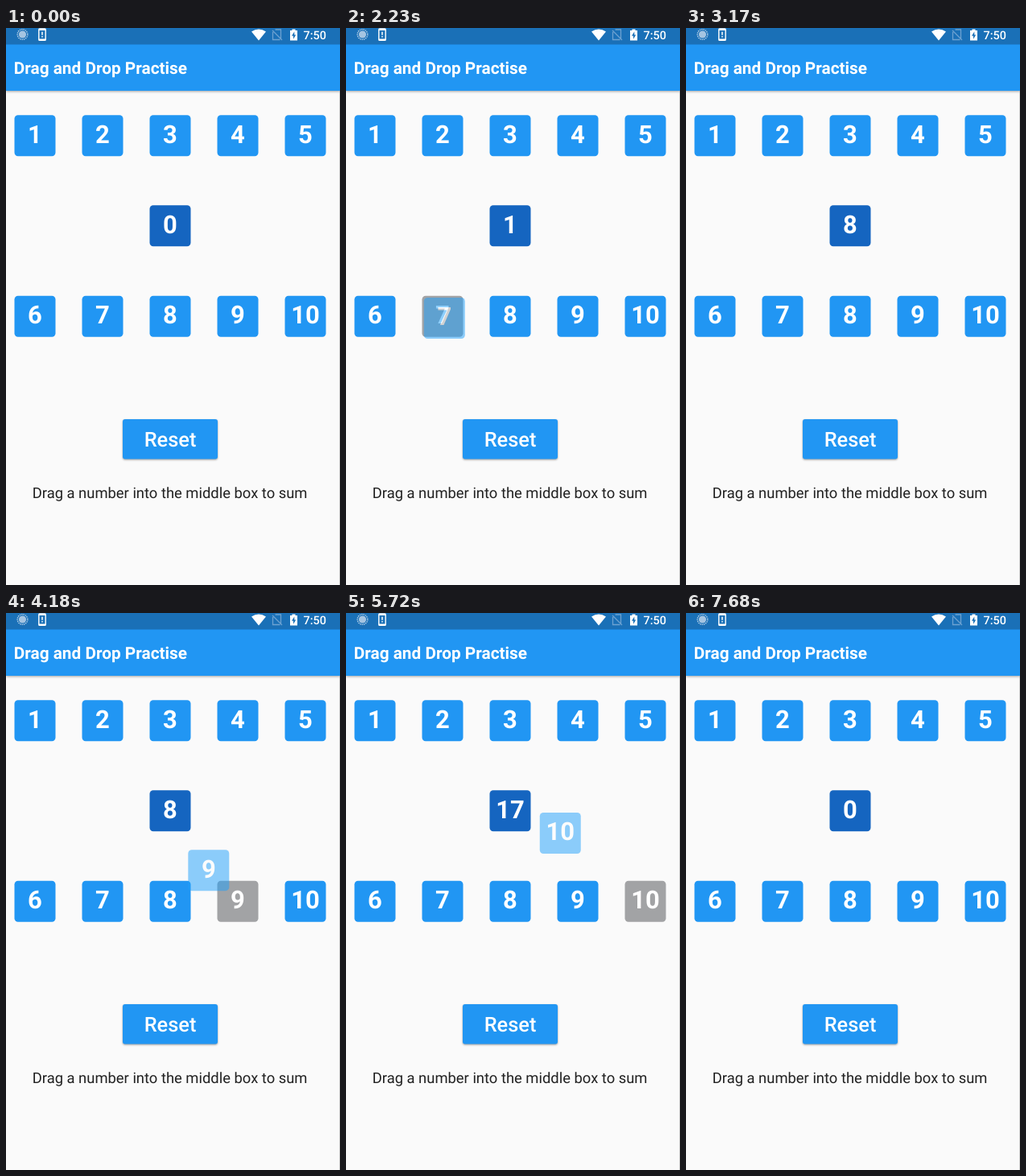
These frames come from a looping animation (415 by 692 pixels, 8 s). An HTML page:

```html
<!DOCTYPE html>
<html lang="en">
<head>
<meta charset="utf-8">
<title>Drag and Drop Practise</title>
<style>
  html, body { margin: 0; width: 100%; height: 100%; overflow: hidden; background: #fafafa; }
  svg { display: block; width: 100vw; height: 100vh; }
  text { font-family: Roboto, "Noto Sans", sans-serif; fill: #fff; text-rendering: geometricPrecision; }
  .tile text { font-size: 31px; font-weight: 700; text-anchor: middle; }
  .bar { filter: drop-shadow(0 1.5px 1.5px rgba(0, 0, 0, .35)); }
</style>
</head>
<body>
<svg id="stage" viewBox="0 0 415 692">
  <defs>
    <clipPath id="buttonClip"><rect x="145" y="486" width="118" height="49.5" rx="3"/></clipPath>
  </defs>
  <rect width="415" height="692" fill="#fafafa"/>
  <rect x="414" y="78" width="1" height="614" fill="#d2d2d2"/>
  <rect class="bar" width="415" height="78" fill="#2196f3"/>
  <rect width="415" height="20.5" fill="#1a70b7"/>

  <g id="status">
    <circle cx="20.5" cy="8" r="4.6" fill="#a5c4e1"/>
    <circle cx="20.5" cy="8" r="6.3" fill="none" stroke="#b4cfe8" stroke-width="1.5" stroke-dasharray="1.3 1"/>
    <rect x="40.8" y="1" width="8.4" height="14.4" rx="1" fill="none" stroke="#fff" stroke-width="1.4"/>
    <path d="M41 2h8M41 14.4h8" stroke="#fff" stroke-width="1.8"/>
    <path d="M45 4.7v4M45 10v1.6" stroke="#fff" stroke-width="1.5"/>
    <path d="M305 4.6Q314 -1.800 323 4.600L314 15.500Z" fill="#fff"/>
    <path d="M334.500 2h7v11.500M331.500 5v9.500h9M331 3l12 12" fill="none" stroke="#6da2d1" stroke-width="1.300"/>
    <path d="M353 3h2.500v-1.500h4v1.500h2.500v12.500h-9z" fill="#fff"/>
    <path d="M358.300 4.500l-3.300 5.200h2v4l3.200-5.200h-1.900z" fill="#1a70b7"/>
    <text x="369.500" y="13.700" font-size="14.400" font-weight="500">7:50</text>
  </g>

  <text x="9.700" y="56.800" font-size="20.800" font-weight="700">Drag and Drop Practise</text>

  <g id="tiles"></g>

  <rect id="button" x="145" y="486" width="118" height="49.5" rx="3" fill="#2196f3"/>
  <g clip-path="url(#buttonClip)">
    <rect id="glow" x="145" y="486" width="118" height="50" fill="#fff" opacity="0"/>
    <circle id="ripple" cx="207" cy="512" fill="#fff" opacity="0"/>
  </g>
  <text x="204" y="519.700" font-size="25.400" font-weight="500" text-anchor="middle">Reset</text>
  <text x="203.600" y="583.500" font-size="18.400" text-anchor="middle" style="fill:#212121">Drag a number into the middle box to sum</text>

  <g id="drag" opacity=".5"></g>
</svg>
<script>
const LOOP = 8000;
const BLUE = '#2196f3', DARK = '#1565c0', GREY = '#a2a3a5', GHOST = '#1fa0fb';
const PRESS = 7320, ZERO = 7420, RELEASE = 7680;
const $ = id => document.getElementById(id);

function node(tag, attrs, parent) {
  const el = document.createElementNS('http://www.w3.org/2000/svg', tag);
  for (const key in attrs) el.setAttribute(key, attrs[key]);
  return parent.appendChild(el);
}

function makeTile(parent, x, y, label, fill) {
  const g = node('g', { class: 'tile', transform: `translate(${x} ${y})` }, parent);
  const rect = node('rect', { width: 51, height: 51, rx: 4.5, fill }, g);
  const text = node('text', { x: 25.5, y: 34.4 }, g);
  text.textContent = label;
  return { g, rect, text };
}

const home = n => ({ x: 10.5 + (n - 1) % 5 * 84, y: n > 5 ? 332.7 : 108.2 });
const tiles = [];
for (let n = 1; n <= 10; n++) {
  const { x, y } = home(n);
  tiles[n] = makeTile($('tiles'), x, y, n, BLUE);
}
const sumTile = makeTile($('tiles'), 178.5, 220.3, 0, DARK);
const ghost = makeTile($('drag'), 0, 0, '', GHOST);

// Each leg: start, end, target x, target y, sharpness in x and y
const drags = [
  { n: 1, drop: 1580, legs: [[740, 1480, 191, 224, 2.34, 2.91]] },
  { n: 7, drop: 3170, legs: [[2230, 3010, 182, 246, 2.6, 3], [3050, 3140, 188, 243, 1.5, 1.5]] },
  { n: 9, drop: 4640, legs: [[3990, 4610, 165, 240, 2.6, 3]] },
  { n: 10, drop: 6540, legs: [[5390, 6190, 191, 233, 3.73, 6.2], [6220, 6510, 176, 224, 2, 2]] }
];

const clamp = v => Math.max(0, Math.min(1, v));
const ease = (u, k) => 1 - Math.pow(1 - Math.pow(u, 1.5), k);

function dragPos(drag, t) {
  let { x, y } = home(drag.n);
  x += 2.3;
  y += 2.3;
  for (const [from, to, tx, ty, kx, ky] of drag.legs) {
    const u = clamp((t - from) / (to - from));
    x += (tx - x) * ease(u, kx);
    y += (ty - y) * ease(u, ky);
  }
  return `translate(${x} ${y})`;
}

function drawButton(t) {
  const on = t >= PRESS && t < RELEASE;
  const u = on ? (t - PRESS) / (RELEASE - PRESS) : 0;
  const lift = Math.sin(Math.PI * u);
  const fade = on ? clamp((1 - u) * 2) : 0;
  $('ripple').setAttribute('r', 8 + 66 * ease(u, 2));
  $('ripple').setAttribute('opacity', .2 * fade);
  $('glow').setAttribute('opacity', .12 * lift);
  $('button').style.filter =
    `drop-shadow(0 ${1.3 + 1.5 * lift}px ${1.2 + lift}px rgba(0,0,0,.38))`;
}

function draw(t) {
  let sum = 0, active = null;
  for (const drag of drags) {
    if (t >= drag.drop) sum += drag.n;
    else if (t >= drag.legs[0][0]) active = drag;
  }
  sumTile.text.textContent = t >= ZERO ? 0 : sum;
  for (let n = 1; n <= 10; n++) {
    tiles[n].rect.setAttribute('fill', active && active.n === n ? GREY : BLUE);
  }
  $('drag').style.display = active ? '' : 'none';
  if (active) {
    ghost.text.textContent = active.n;
    ghost.g.setAttribute('transform', dragPos(active, t));
  }
  drawButton(t);
}

const begin = performance.now();
function tick() {
  draw((performance.now() - begin) % LOOP);
  requestAnimationFrame(tick);
}
tick();
</script>
</body>
</html>
```
